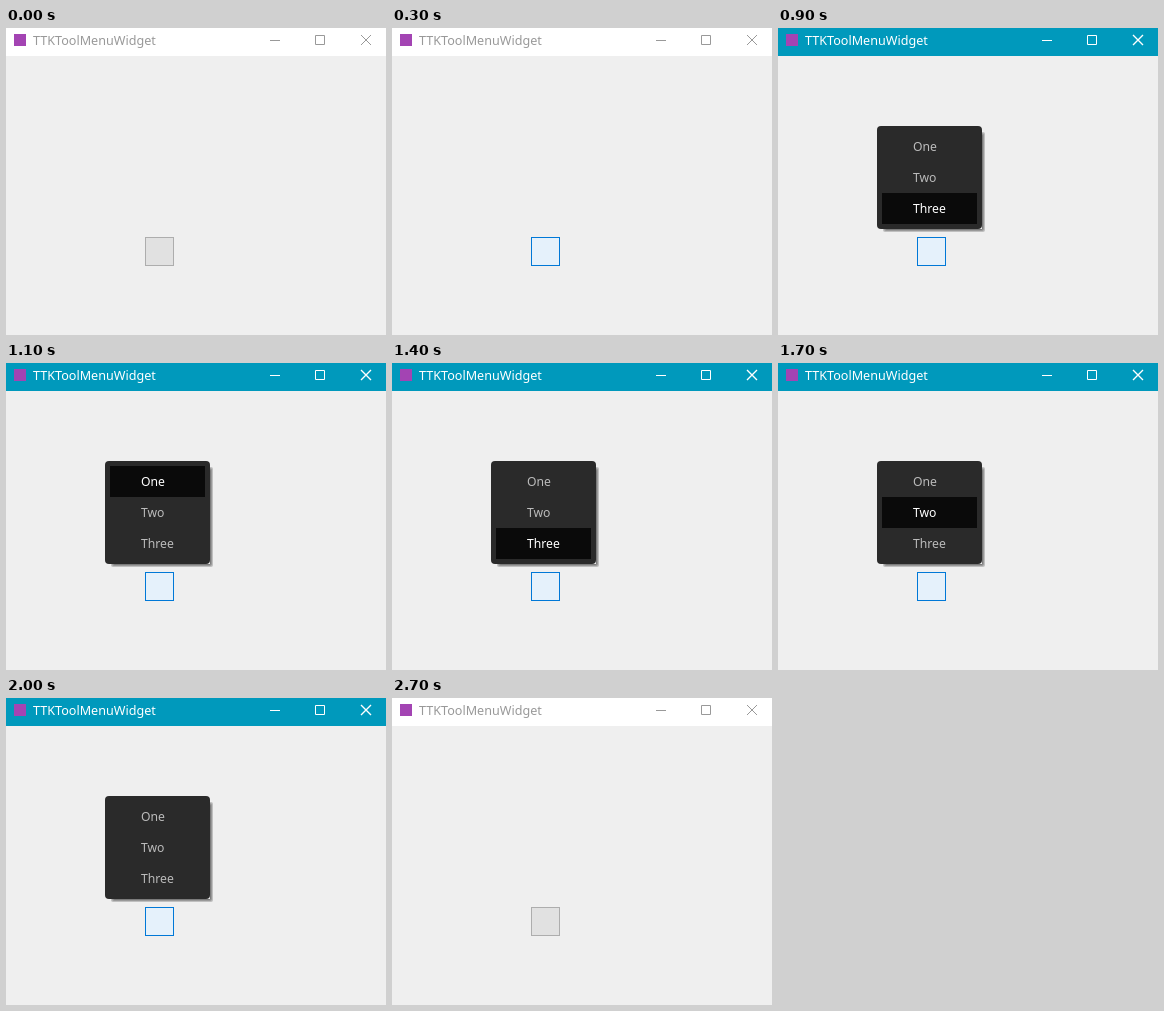
An HTML page with a canvas that plays this animation: 380 px wide and 307 px high, repeating every 2.8 s.

```html
<!DOCTYPE html>
<html lang="en">
<head>
<meta charset="utf-8">
<title>TTKToolMenuWidget</title>
<style>
  html, body { margin: 0; width: 100%; height: 100%; overflow: hidden; background: #efefef; }
  canvas { display: block; width: 380px; height: 307px; }
</style>
</head>
<body>
<canvas id="stage" width="380" height="307"></canvas>
<script>
const ctx = document.getElementById('stage').getContext('2d');
const LOOP = 2800;
const FONT = '"Noto Sans", "Open Sans", sans-serif';
const BACKDROP = '#efefef';
const ITEMS = ['One', 'Two', 'Three'];
const MENU = { x: 99, y: 98, w: 105, h: 103, pad: 5, row: 31 };

// Each entry: start time, value held until the next entry
const HOVER = [[0, -1], [900, 2], [1000, 1], [1100, 0], [1300, 1], [1400, 2],
               [1700, 1], [1800, 0], [1900, 1], [2000, -1]];
const FADE = [[0, 0], [600, 0.44], [700, 1], [2700, 0]];
const BUTTON = [[0, 'idle'], [300, 'hover'], [500, 'pressed'], [600, 'hover'], [2700, 'idle']];
const BUTTON_COLORS = {
  idle: ['#adadad', '#e1e1e1'],
  hover: ['#0078d7', '#e5f1fb'],
  pressed: ['#005499', '#cce4f7']
};

function valueAt(track, t) {
  let value = track[0][1];
  for (const [start, v] of track) if (t >= start) value = v;
  return value;
}

function rect(x, y, w, h, color) {
  ctx.fillStyle = color;
  ctx.fillRect(x, y, w, h);
}

function roundRect(x, y, w, h, r, color) {
  ctx.fillStyle = color;
  ctx.beginPath();
  ctx.roundRect(x, y, w, h, r);
  ctx.fill();
}

function label(text, x, y, size, color) {
  ctx.font = `${size}px ${FONT}`;
  ctx.fillStyle = color;
  ctx.fillText(text, x, y);
}

function titleBar(active) {
  const ink = active ? '#ffffff' : '#999999';
  rect(0, 0, 380, 28, active ? '#0099bc' : '#ffffff');
  rect(8, 6, 12, 12, '#a344b3');
  label('TTKToolMenuWidget', 27, 17, 12.6, ink);

  ctx.strokeStyle = ink;
  ctx.lineWidth = 1;
  ctx.beginPath();
  ctx.moveTo(264, 12.5);
  ctx.lineTo(274, 12.5);
  ctx.rect(309.5, 7.5, 9, 9);
  ctx.stroke();

  ctx.lineWidth = active ? 1.4 : 1;
  ctx.beginPath();
  ctx.moveTo(355, 7);
  ctx.lineTo(365, 17);
  ctx.moveTo(365, 7);
  ctx.lineTo(355, 17);
  ctx.stroke();
}

function button(state) {
  const [border, fill] = BUTTON_COLORS[state];
  rect(139, 209, 29, 29, border);
  rect(140, 210, 27, 27, fill);
}

function menuShadow() {
  const { x, y, w, h } = MENU;
  ctx.save();
  ctx.beginPath();
  ctx.rect(0, 0, 380, 307);
  ctx.rect(x, y, w, h);
  ctx.clip('evenodd');
  for (let i = 0; i < 3; i++) {
    roundRect(x + 8 - i, y + 8 - i, w - 7 + 2 * i, h - 7 + 2 * i, 2, 'rgba(0, 0, 0, 0.2)');
  }
  ctx.restore();
}

function menu(alpha, hover) {
  const { x, y, w, h, pad, row } = MENU;
  menuShadow();
  roundRect(x, y, w, h, 4, '#2a2a2a');
  ITEMS.forEach((text, i) => {
    const top = y + pad + i * row;
    if (i === hover) rect(x + pad, top, w - 2 * pad, row, '#0a0a0a');
    label(text, 135, top + 20, 12.2, i === hover ? '#ffffff' : '#bbbbbb');
  });
  // Veil in the backdrop colour fades panel and text as one
  ctx.globalAlpha = 1 - alpha;
  roundRect(x, y, w, h, 4, BACKDROP);
  ctx.globalAlpha = 1;
}

function draw(t) {
  rect(0, 0, 380, 307, BACKDROP);
  titleBar(t >= 500 && t < 2700);
  button(valueAt(BUTTON, t));
  const alpha = valueAt(FADE, t);
  if (alpha > 0) menu(alpha, valueAt(HOVER, t));
}

const start = performance.now();
function tick() {
  draw((performance.now() - start) % LOOP);
  requestAnimationFrame(tick);
}
tick();
</script>
</body>
</html>
```
